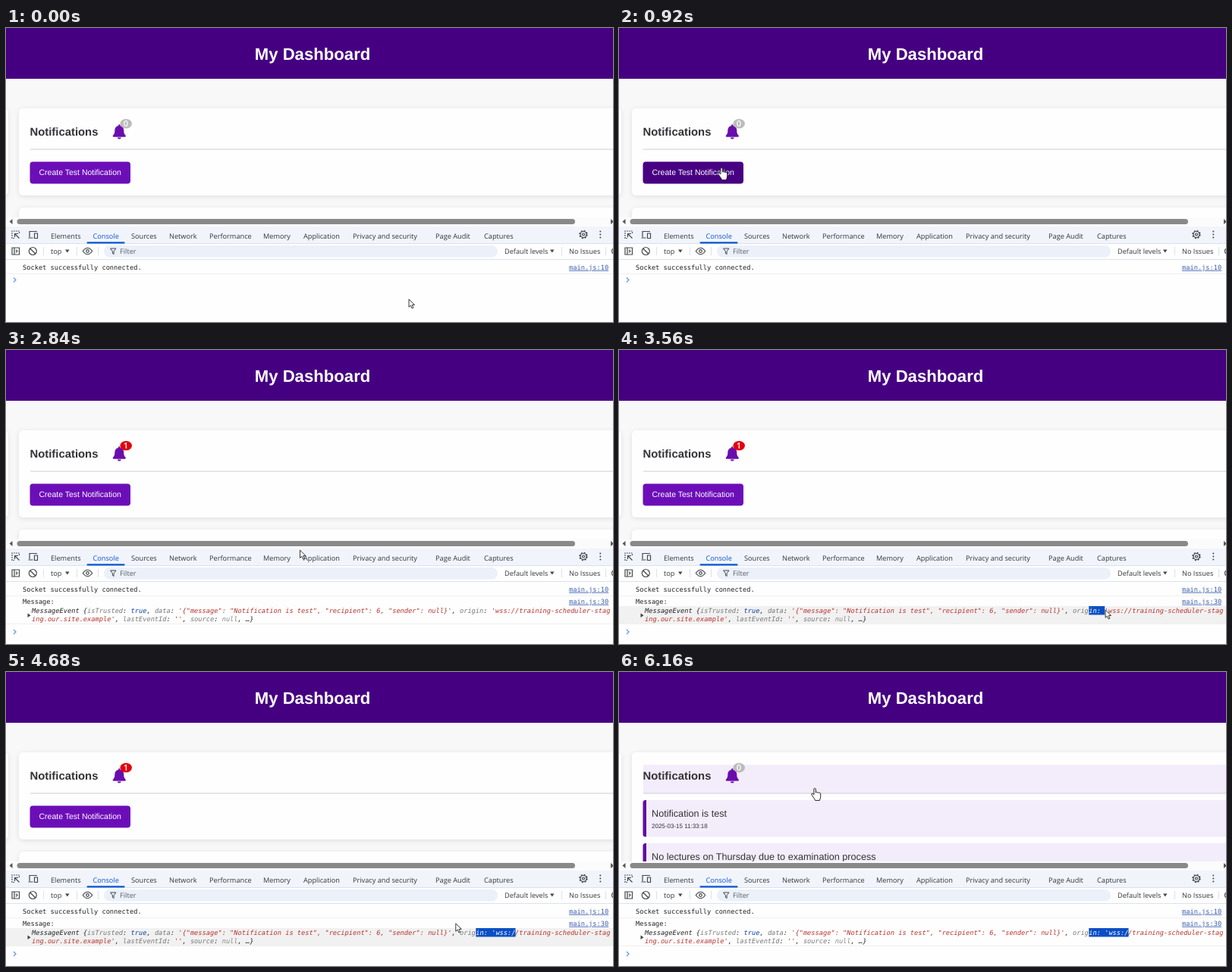
An HTML page that plays this animation: 800 by 388 pixels, repeating every 6200 ms.

```html
<!DOCTYPE html>
<html lang="en">
<head>
<meta charset="utf-8">
<title>Dashboard notifications</title>
<style>
html, body { margin: 0; width: 100%; height: 100%; overflow: hidden; background: #fff; }
svg { display: block; width: 100%; height: 100%; }
text { white-space: pre; text-rendering: geometricPrecision; }
.page { font-family: "Liberation Sans", Arial, sans-serif; }
.ui { font: 9.2px "Open Sans", "Noto Sans", sans-serif; fill: #33363b; }
.mono { font: 8.68px "DejaVu Sans Mono", monospace; fill: #222; }
.it { font-style: italic; }
.key { fill: #777; }
.str { fill: #b8322c; }
.num { fill: #0b3fa8; }
.link { fill: #3a5fb0; text-decoration: underline; }
.icon { fill: none; stroke: #44474c; stroke-width: 1.2; }
.sep { stroke: #dae2ef; }
</style>
</head>
<body>
<svg viewBox="0 0 800 388" preserveAspectRatio="none">
  <defs>
    <clipPath id="view"><rect width="800" height="250"/></clipPath>
    <clipPath id="listClip"><rect id="listBox" x="17" y="161" width="783" height="0"/></clipPath>
    <filter id="shadow" x="-10%" y="-15%" width="120%" height="135%">
      <feDropShadow dx="0" dy="1.5" stdDeviation="3" flood-opacity=".1"/>
    </filter>
  </defs>
  <rect width="800" height="388" fill="#fefefe"/>

  <g class="page" clip-path="url(#view)">
    <rect width="800" height="250" fill="#f8f8f8"/>
    <rect id="sideCard" x="-60" y="106" width="63" height="115" rx="6" fill="#fefefe" filter="url(#shadow)"/>
    <rect id="card" x="17" y="106" width="830" height="115" rx="6" fill="#fefefe" filter="url(#shadow)"/>
    <rect id="nextCard" x="17" y="237" width="830" height="90" rx="6" fill="#fefefe" filter="url(#shadow)"/>
    <rect id="titleBg" x="32" y="122.5" width="768" height="37.5" fill="#f3ecfb"/>
    <rect x="32" y="159.5" width="768" height="1.2" fill="#d8d6de"/>
    <text x="31.5" y="141.6" font-size="14.85" font-weight="700" fill="#333338">Notifications</text>
    <path fill="#6a0dad" d="M149.300 127.200a1.200 1.200 0 0 1 1.200 1.200v.6c2.900.6 4.800 3 4.800 6v1.600c0 2.200.8 3.700 2.200 5.100.9.900.4 2-.8 2h-14.800c-1.200 0-1.700-1.100-.8-2 1.400-1.400 2.200-2.900 2.200-5.100v-1.600c0-3 1.900-5.400 4.800-6v-.6a1.200 1.200 0 0 1 1.200-1.200zM146.900 144.400h4.800a2.400 2.200 0 0 1-4.800 0z"/>
    <ellipse id="badge" cx="158.200" cy="126.300" rx="7.700" ry="6.300"/>
    <text id="count" x="158" y="130.200" text-anchor="middle" fill="#fff" font-size="11" font-weight="600" font-family="Open Sans, sans-serif"></text>
    <g id="button">
      <rect id="buttonBg" x="31.500" y="176.500" width="132.500" height="29" rx="4"/>
      <text x="43.500" y="194.400" font-size="10.500" fill="#fff">Create Test Notification</text>
    </g>
    <g id="list" clip-path="url(#listClip)"></g>
    <rect width="800" height="67" fill="#450081"/>
    <text x="404" y="41.600" text-anchor="middle" font-size="22.150" font-weight="700" fill="#fff">My Dashboard</text>
  </g>

  <rect y="250" width="800" height="12" fill="#fbfbfb"/>
  <rect x="14.500" y="252" width="735.500" height="7" rx="3.500" fill="#898989"/>
  <path fill="#555" d="M8.500 252v7l-4-3.500zM797 252v7l4-3.500z"/>

  <rect y="262" width="800" height="22" fill="#f1f4fb"/>
  <path class="sep" d="M0 284.500H800M0 305.500H800"/>
  <g id="tools" class="ui"></g>
  <g class="icon">
    <path d="M11 277.500H8V268h9.500v3" stroke-dasharray="1.700 1.200"/>
    <path d="M11.500 271.500l6 6m-6-1.500v-4.500h4.500"/>
    <path d="M31 276v-7.500h10M29.500 277h6M37.500 271h4v6.500h-4z"/>
    <path d="M8 290h9.500v9H8zM11 290v9M13 292.700l2 1.800-2 1.800"/>
    <circle cx="35.300" cy="294.500" r="5"/><path d="M31.800 291l7 7"/>
    <path d="M101.300 294.500q6.200-8.500 12.400 0q-6.200 8.500-12.400 0z"/><circle cx="107.500" cy="294.500" r="1.800"/>
    <circle cx="761" cy="272.500" r="5" stroke-width="1.400" stroke-dasharray="2 1.927"/>
    <circle cx="761" cy="272.500" r="4"/><circle cx="761" cy="272.500" r="1.500"/>
    <circle cx="802" cy="294.500" r="3.500"/>
  </g>
  <path d="M783.300 268.500h.01m0 4h.01m0 4h.01" stroke="#44474c" stroke-width="2" stroke-linecap="round"/>

  <g class="mono">
    <text x="22" y="318.800">Socket successfully connected.</text>
    <text class="link" x="742" y="318.800">main.js:10</text>
    <path d="M0 324.500H800" stroke="#f0f0f0"/>
    <g id="message">
      <rect id="rowBg" y="338" width="800" height="23" fill="#f1f1f1"/>
      <path d="M0 361.500H800" stroke="#f0f0f0"/>
      <text x="22" y="334.800">Message:</text>
      <text class="link" x="742" y="334.800">main.js:30</text>
      <path d="M28.500 347.500v5.500l4-2.750z" fill="#444"/>
      <text class="it" x="34" y="346.800">MessageEvent {<tspan class="key">isTrusted</tspan>: <tspan class="num">true</tspan>, <tspan class="key">data</tspan>: <tspan class="str">'{"message": "Notification is test", "recipient": 6, "sender": null}'</tspan>, <tspan class="key">origin</tspan>: <tspan class="str">'wss://training-scheduler-stag</tspan></text>
      <text class="it" x="34" y="358.300"><tspan class="str">ing.our.site.example'</tspan>, <tspan class="key">lastEventId</tspan>: <tspan class="str">''</tspan>, <tspan class="key">source</tspan>: <tspan fill="#888">null</tspan>, …}</text>
      <rect id="selBg" y="338" height="11.500" fill="#0b4fc4"/>
      <text id="sel" class="it" y="346.800" style="fill:#fff"></text>
    </g>
    <path id="prompt" d="M10 329.500l3 3-3 3" fill="none" stroke="#5f97ea" stroke-width="1.200"/>
  </g>

  <g id="cursor" stroke-linejoin="round">
    <path id="arrow" d="M0 0v10.300l2.400-2.200 1.700 3.900 1.800-.8-1.700-3.800h3.300z" fill="#fff" stroke="#222" stroke-width=".9"/>
    <path id="hand" transform="translate(1 .5) scale(1.1)" d="M-1 1.200c0-1.600 2.200-1.600 2.200 0v4c.3-1 2-.9 2 .2.400-.8 1.900-.6 2 .4.500-.6 1.800-.4 1.800.8v3.600c0 1.800-.9 2.600-1.200 4.300h-5.300c-.4-1.700-1.500-2.600-2.300-3.900l-1.900-2.900c-.8-1.300.7-2.100 1.700-1.100l1 1.100z" fill="#fff" stroke="#222" stroke-width=".9"/>
  </g>
</svg>
<script>
const LOOP = 6200, CHAR = 8.68 * 0.60205, SEL_X = 34 + 112 * CHAR, SEL_TEXT = "in: 'wss:/";
const MESSAGE_AT = 1680, OPEN_AT = 5400, LIST_H = 200;

// Pointer stops: time, x, y
const STOPS = [
  [0, 531, 358], [40, 531, 358], [640, 345, 276], [900, 134, 184], [2300, 134, 184],
  [2840, 387, 264], [3240, 618, 343], [3560, 641, 343], [3900, 672, 343],
  [4100, 672, 343], [4680, 593, 332], [5280, 257, 153], [LOOP, 257, 153]
];

const $ = id => document.getElementById(id);
const set = (id, attrs) => { for (const k in attrs) $(id).setAttribute(k, attrs[k]); };
const show = (id, on) => set(id, { visibility: on ? "visible" : "hidden" });
const ramp = (t, a, b) => Math.min(1, Math.max(0, (t - a) / (b - a)));
const smooth = u => u * u * (3 - 2 * u);
const mix = (a, b, u) => `rgb(${a.map((v, i) => Math.round(v + (b[i] - v) * u))})`;

// Speed at a stop: harmonic mean of both sides, zero where the pointer turns or rests
const secant = (i, k) => STOPS[i + 1] && STOPS[i]
  ? (STOPS[i + 1][k] - STOPS[i][k]) / (STOPS[i + 1][0] - STOPS[i][0]) : 0;
function speed(i, k) {
  const a = secant(i - 1, k), b = secant(i, k);
  return a * b > 0 ? 2 * a * b / (a + b) : 0;
}
function pointer(t, k) {
  let i = 0;
  while (i < STOPS.length - 2 && t >= STOPS[i + 1][0]) i++;
  const d = STOPS[i + 1][0] - STOPS[i][0], u = (t - STOPS[i][0]) / d, v = 1 - u;
  return STOPS[i][k] * (1 + 2 * u) * v * v + STOPS[i + 1][k] * u * u * (3 - 2 * u)
    + d * u * v * (speed(i, k) * v - speed(i + 1, k) * u);
}

function buildTools() {
  const tabs = [["Elements", 59], ["Console", 114.5], ["Sources", 165], ["Network", 215],
    ["Performance", 268], ["Memory", 339], ["Application", 392],
    ["Privacy and security", 457], ["Page Audit", 566], ["Captures", 630]];
  const label = (s, x, y, fill = "") => `<text x="${x}" y="${y}" style="fill:${fill}">${s}</text>`;
  const down = x => `<path d="M${x} 292.500h5.500l-2.750 4z" fill="#44474c"/>`;
  const seps = [49.5, 93.5, 121.5, 732.5, 790.5].map(x => `M${x} 289v11`).join("");
  $("tools").innerHTML = tabs.map(([s, x]) => label(s, x, 277.6, s === "Console" ? "#0b57d0" : "")).join("")
    + `<rect x="106.500" y="282.300" width="50" height="2.200" rx="1" fill="#0b57d0"/>`
    + `<path class="sep" d="${seps}"/>`
    + `<rect x="129" y="287" width="519" height="15.500" rx="7.750" fill="#ebf0f9"/>`
    + `<path d="M137.500 291h7.500l-2.900 3.700v3.800l-1.700-1v-2.800z" fill="none" stroke="#44474c"/>`
    + label("top", 59, 297.8) + down(78) + label("Filter", 150, 297.8, "#5a5e65")
    + label("Default levels", 657, 297.8) + down(717) + label("No Issues", 742, 297.8);
}

function buildList() {
  const items = [["Notification is test", "2025-03-15 11:33:18"],
    ["No lectures on Thursday due to examination process", ""]];
  $("list").innerHTML = items.map(([title, date], i) =>
    `<g transform="translate(0 ${169 + i * 57})">
      <path d="M36 0H800V48.500H36z" fill="#f3ecfb"/>
      <path d="M36 0V48.500H35a3.500 3.500 0 0 1-3.500-3.500V3.500A3.500 3.500 0 0 1 35 0z" fill="#5f0ca3"/>
      <text x="43" y="22" font-size="12.650" fill="#333">${title}</text>
      <text x="43" y="36.700" font-size="8" fill="#333">${date}</text></g>`).join("");
}

function draw(t) {
  const x = pointer(t, 1), y = pointer(t, 2);
  const arrived = t >= MESSAGE_AT, opened = t >= OPEN_AT;
  const grow = LIST_H * smooth(ramp(t, OPEN_AT, OPEN_AT + 400));

  const overButton = x > 32 && x < 164 && y > 177 && y < 205;
  const overTitle = x > 32 && y > 122 && y < 160;
  set("cursor", { transform: `translate(${x.toFixed(2)} ${y.toFixed(2)})` });
  show("hand", overButton || overTitle);
  show("arrow", !(overButton || overTitle));

  const hover = ramp(t, 820, 900) - ramp(t, 2400, 2600);
  set("buttonBg", { fill: mix([108, 14, 184], [71, 0, 130], hover) });
  set("titleBg", { opacity: ramp(t, 5160, 5300) });

  set("badge", { fill: arrived && !opened ? "#e3000f" : "#bcbcbc" });
  $("count").textContent = arrived && !opened ? "1" : "0";

  set("listBox", { height: grow });
  set("button", { transform: `translate(0 ${grow})` });
  set("card", { height: 115 + grow });
  set("sideCard", { height: 115 + grow });
  set("nextCard", { y: 237 + grow });

  set("message", { display: arrived ? "inline" : "none" });
  set("prompt", { transform: `translate(0 ${arrived ? 39.5 : 0})` });
  set("rowBg", { opacity: y > 330 ? 1 : 0 });

  const reach = pointer(Math.min(t, 3900), 1);
  const n = t < 3240 ? 0 : Math.min(SEL_TEXT.length, Math.max(0, Math.round((reach - SEL_X) / CHAR)));
  set("selBg", { x: SEL_X, width: n * CHAR });
  set("sel", { x: SEL_X });
  $("sel").textContent = SEL_TEXT.slice(0, n);
}

function tick() {
  draw(performance.now() % LOOP);
  requestAnimationFrame(tick);
}

buildTools();
buildList();
tick();
</script>
</body>
</html>
```
